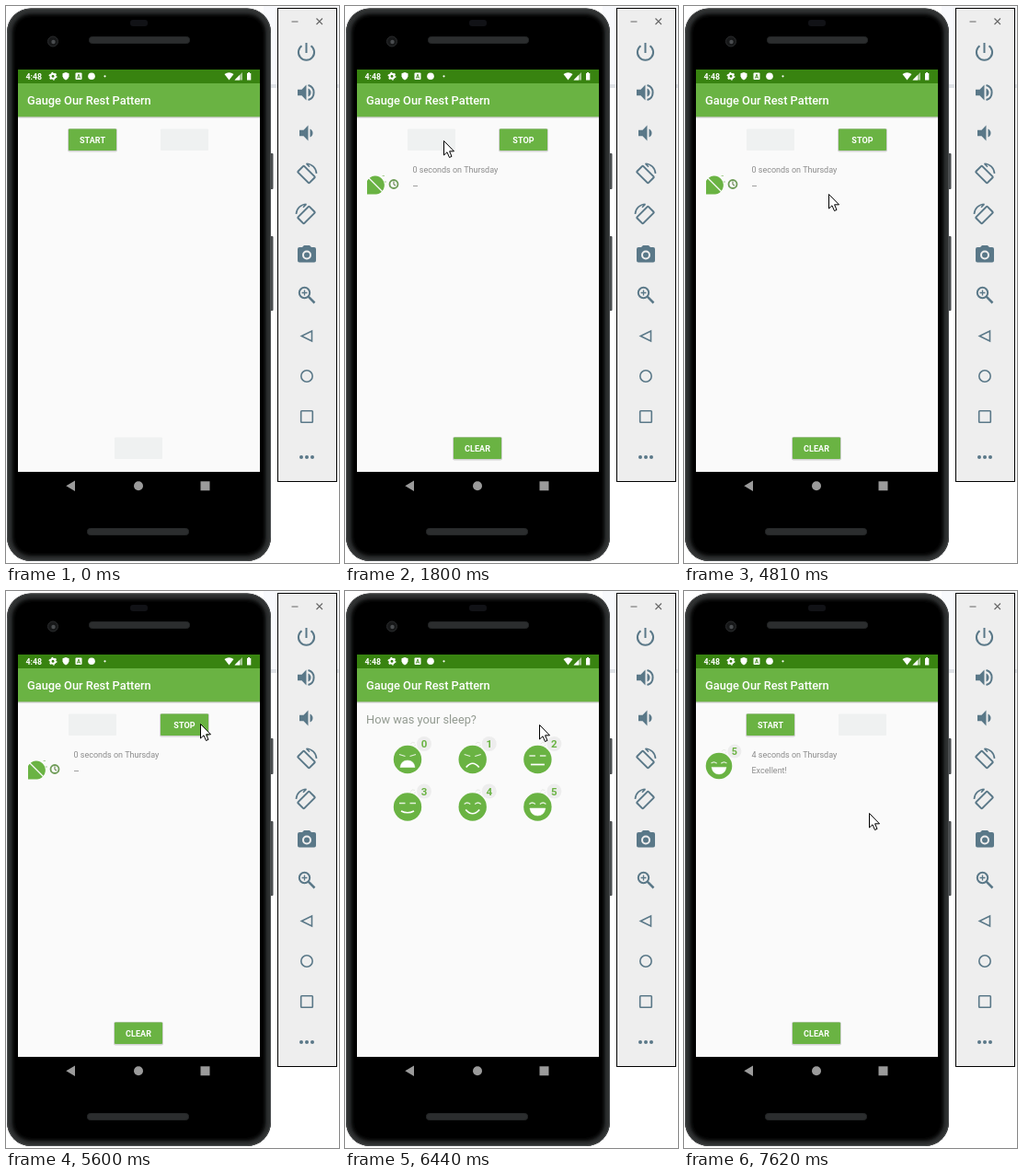
These frames come from a looping animation (362 px wide and 605 px high, 8 s). An HTML page:

```html
<!DOCTYPE html>
<html lang="en">
<head>
<meta charset="utf-8">
<title>Sleep tracker demo</title>
<style>
  html, body { margin: 0; width: 100%; height: 100%; overflow: hidden; background: #fff; }
  svg { display: block; width: 362px; height: 605px; font-family: Roboto, "Open Sans", sans-serif; }
  .btn text { font-size: 9px; font-weight: 700; fill: #fff; text-anchor: middle; letter-spacing: .1px; }
  .note { font-size: 9px; fill: #8c8c8c; }
  .line { fill: none; stroke: #5a7888; stroke-width: 2; }
  .thin { stroke-width: 1.6; }
  .solid { fill: #5a7888; }
</style>
</head>
<body>
<svg viewBox="0 0 362 605">
  <defs>
    <clipPath id="screen"><rect x="13" y="69" width="263" height="437"/></clipPath>
    <clipPath id="body"><rect x="1" y="2.500" width="287" height="600.500" rx="26"/></clipPath>
    <filter id="soft"><feGaussianBlur stdDeviation="2.500"/></filter>
    <linearGradient id="shade" x2="0" y2="1">
      <stop offset="0" stop-color="#000" stop-opacity=".25"/>
      <stop offset="1" stop-color="#000" stop-opacity="0"/>
    </linearGradient>
  </defs>

  <rect width="362" height="605" fill="#fff"/>
  <rect x="280" width="82" height="86" fill="#f8f9fc"/>
  <rect x="280" y="85" width="82" height="4" fill="#dfe2e7"/>

  <g id="phone">
    <rect x="286" y="160" width="4.500" height="39" rx="1" fill="#4a4e50"/>
    <rect x="286" y="250" width="4.500" height="81" rx="1" fill="#4a4e50"/>
    <g clip-path="url(#body)">
      <rect width="290" height="605" fill="#000"/>
      <rect x="3" y="5" width="283" height="596" rx="24" fill="none" stroke="#3c3f41" stroke-width="6" filter="url(#soft)"/>
      <rect x="1.500" y="3" width="286" height="599.500" rx="25.500" fill="none" stroke="#4c4f51"/>
      <rect x="5.500" y="7" width="278" height="592" rx="22" fill="none" stroke="#26282a"/>
    </g>
    <circle cx="51" cy="38.500" r="5.500" fill="#171819" stroke="#2a2c2d"/>
    <circle cx="51.500" cy="39" r="2.200" fill="#4a4d50"/>
    <rect x="135" y="15" width="19" height="7" rx="3" fill="#111216"/>
    <rect x="90.500" y="33.500" width="109" height="7" rx="3" fill="#2b2d2e" stroke="#242627"/>
    <rect x="88.500" y="567.500" width="110" height="7" rx="3" fill="#2b2d2e" stroke="#242627"/>
    <g fill="#9b9b9b">
      <path d="M75 515.500V527L65.300 521.200Z"/>
      <circle cx="144" cy="521.200" r="5"/>
      <rect x="211.500" y="516.300" width="10" height="10"/>
    </g>
  </g>

  <g clip-path="url(#screen)">
    <rect x="13" y="69" width="263" height="437" fill="#fafafa"/>
    <g id="tracker">
      <g id="oldRow">
        <path d="M24 190A10 10 0 1 1 34 204.500H24Z" fill="#6ab343"/>
        <path d="M25 186L43.500 204.500" stroke="#fafafa" stroke-width="1.200"/>
        <path d="M40.500 184.500H43M42.500 191H45" stroke="#a9cf94"/>
        <circle cx="53" cy="193.500" r="4.500" fill="#fafafa" stroke="#6f9c58" stroke-width="1.800"/>
        <path d="M53 190.500V194L55.200 195" fill="none" stroke="#58763f"/>
        <text class="note" x="73.500" y="181">0 seconds on Thursday</text>
        <path d="M74 195.500H79" stroke="#a0a0a0"/>
      </g>
      <g id="newRow">
        <g id="rated" transform="translate(38 190) scale(.94)"></g>
        <text class="note" x="73.500" y="181">4 seconds on Thursday</text>
        <text class="note" x="73.500" y="198">Excellent!</text>
      </g>
    </g>
    <g id="quality">
      <text x="23" y="144" font-size="12.800" fill="#929a90">How was your sleep?</text>
    </g>
    <rect x="13" y="120" width="263" height="2.500" fill="url(#shade)"/>
    <rect x="13" y="69" width="263" height="15" fill="#388310"/>
    <rect x="13" y="84" width="263" height="36.300" fill="#6ab343"/>
    <text x="23" y="107" font-size="12.800" font-weight="500" fill="#fff">Gauge Our Rest Pattern</text>
    <g fill="#fff">
      <text x="21.500" y="80" font-size="8.800" font-weight="700">4:48</text>
      <circle cx="51" cy="76.300" r="2.500" fill="none" stroke="#fff" stroke-width="2"/>
      <circle cx="51" cy="76.300" r="3.800" fill="none" stroke="#fff" stroke-width="1.400" stroke-dasharray="1.700 2.280"/>
      <path d="M65 72L68.500 73.300V76.500Q68 79 65 80.500Q62 79 61.500 76.500V73.300Z"/>
      <rect x="75.500" y="72.500" width="7" height="7.500" rx="1"/>
      <path d="M77.300 78.700L79 74L80.700 78.700M78 77.300H80" fill="none" stroke="#388310" stroke-width=".8"/>
      <circle cx="93" cy="76.300" r="3.800"/>
      <circle cx="107.500" cy="76.300" r="1.100"/>
      <path d="M237.500 74Q242.500 70.500 247.500 74L242.500 80.500Z"/>
      <path d="M257 72V80.500H248.500Z" fill-opacity=".55"/>
      <path d="M254 75V80.500H248.500Z"/>
      <path d="M262 73H263V72H265V73H266.300V80.500H262Z"/>
    </g>
  </g>

  <g id="panel">
    <rect x="295.500" y="2.500" width="64" height="514" fill="#eee" stroke="#000"/>
    <path d="M310.500 17H317.500M337.500 13.500L344 20M344 13.500L337.500 20" stroke="#666" stroke-width="1.100"/>
    <g transform="translate(326.500 50)" class="line">
      <path d="M0 -10V1M-5 -6.800A8.600 8.600 0 1 0 5 -6.800"/>
    </g>
    <g transform="translate(326.500 94)">
      <path id="horn" class="solid" d="M-9.500 -3.200H-5L0 -8.500V8.500L-5 3.200H-9.500Z"/>
      <path id="wave" class="solid" d="M2 -4.500Q5 -3 5 0T2 4.500Z"/>
      <path class="line" d="M2 -8A8.300 8.300 0 0 1 2 8"/>
    </g>
    <g transform="translate(328.500 138)">
      <use href="#horn"/>
      <use href="#wave"/>
    </g>
    <g transform="translate(326.500 182)">
      <g id="turn" class="line">
        <rect x="-4.800" y="-8.800" width="9.600" height="17.600" rx="1" transform="translate(0 1) rotate(-45)"/>
        <path class="thin" d="M0 -10.800A11.200 11.200 0 0 1 11 0M0 -10.800L3.500 -7.300"/>
      </g>
    </g>
    <use href="#turn" transform="translate(326.500 226) scale(-1 1)"/>
    <g transform="translate(327 269.500)">
      <path class="solid" d="M-3 -9.500H3L5 -7.500H8Q10 -7.500 10 -5.500V7Q10 9 8 9H-8Q-10 9 -10 7V-5.500Q-10 -7.500 -8 -7.500H-5Z"/>
      <circle class="solid" cy="1" r="4" stroke="#eee" stroke-width="2"/>
    </g>
    <g transform="translate(327 314)" class="line">
      <circle cx="-2.500" cy="-2.500" r="5.700"/>
      <path d="M1.700 1.700L8.500 8.500" stroke-width="2.500"/>
      <path d="M-5.500 -2.500H.5M-2.500 -5.500V.5" stroke-width="1.300"/>
    </g>
    <path class="line thin" d="M332.500 353V364L321.300 358.500Z"/>
    <circle class="line thin" cx="327" cy="402" r="6.200"/>
    <rect class="line thin" x="320.700" y="439.700" width="12.600" height="12.600" rx=".8"/>
    <g class="solid">
      <circle cx="321" cy="490" r="2"/><circle cx="327" cy="490" r="2"/><circle cx="333" cy="490" r="2"/>
    </g>
  </g>

  <path id="cursor" d="M.5 .5V16L4 12.800L6.500 18.500L9 17.400L6.600 11.800H11.500Z" fill="#fff" stroke="#000"/>
</svg>

<script>
const LOOP = 8000;
const GREEN = '#6ab343';
const $ = id => document.getElementById(id);

function add(parent, tag, attrs, text = '') {
  const el = document.createElementNS('http://www.w3.org/2000/svg', tag);
  for (const key in attrs) el.setAttribute(key, attrs[key]);
  el.textContent = text;
  return parent.appendChild(el);
}

// Buttons
function makeButton(label, x, y) {
  const g = add($('tracker'), 'g', { class: 'btn' });
  const box = { width: 52, height: 23.5, rx: 1 };
  add(g, 'rect', { ...box, x, y, fill: '#eff1f1' });
  const on = add(g, 'g', {});
  add(on, 'rect', { x: x - 1, y: y - .5, width: 54, height: 25.5, rx: 2, fill: '#000', opacity: .16 });
  add(on, 'rect', { ...box, x, y, fill: GREEN });
  const glow = add(on, 'rect', { ...box, x, y, fill: '#fff', opacity: 0 });
  add(on, 'text', { x: x + 26, y: y + 15.5 }, label);
  return (enabled, pressed) => {
    on.style.display = enabled ? '' : 'none';
    glow.setAttribute('opacity', pressed ? .18 : 0);
  };
}
const setStart = makeButton('START', 68, 133.5);
const setStop = makeButton('STOP', 168, 133.5);
const setClear = makeButton('CLEAR', 118, 468.5);

// Faces, centred on 0,0
const SLANTED = 'M-9 -5.500L-2.500 -3.500M9 -5.500L2.500 -3.500';
const FLAT = 'M-9 -4H-2.500M2.500 -4H9';
const ARCHED = 'M-9 -3Q-6 -6 -2.500 -3M2.500 -3Q6 -6 9 -3';
const EYES = [SLANTED, SLANTED, FLAT, FLAT, ARCHED, ARCHED];
const MOUTHS = [
  'M-8 8.500Q-7 1 0 1T8 8.500Z',
  'M-7 8.500Q0 0 7 8.500',
  'M-7.500 5.500H7.500',
  'M-7 4.500Q0 8 7 4.500',
  'M-7.500 3Q0 11.500 7.500 3',
  'M-8.500 1.500H8.500Q7 9.500 0 9.500T-8.500 1.500Z'
];

function drawFace(g, score) {
  const open = score % 5 === 0;
  add(g, 'circle', { cx: 18, cy: -17, r: 8, fill: '#ededed' });
  add(g, 'path', { d: 'M3 -16.500Q5 -20 8 -18M7 -14.500L9 -16', fill: 'none', stroke: '#e6e9e4' });
  add(g, 'circle', { r: 15.2, fill: GREEN });
  add(g, 'path', { d: EYES[score], fill: 'none', stroke: '#e4f1dc', 'stroke-width': 1.3 });
  add(g, 'path', {
    d: MOUTHS[score], fill: open ? '#fff' : 'none',
    stroke: '#fff', 'stroke-width': open ? .5 : 1.7
  });
  add(g, 'text', {
    x: 18, y: -13, fill: GREEN, 'font-size': 11.5, 'font-weight': 700, 'text-anchor': 'middle'
  }, score);
}
for (let i = 0; i < 6; i++) {
  const x = 68 + i % 3 * 70.7, y = i < 3 ? 183 : 234.5;
  drawFace(add($('quality'), 'g', { transform: `translate(${x} ${y})` }), i);
}
drawFace($('rated'), 5);

const BURSTS = [
  [0, 0, 1], [510, 1250, 11], [1320, 1800, 7], [2170, 2570, 6], [2720, 2870, 3],
  [4810, 4810, 1], [4950, 5750, 12], [5810, 6520, 10], [6760, 7530, 11], [7620, 7620, 1]
];
const TICKS = BURSTS.flatMap(([from, to, n]) =>
  Array.from({ length: n }, (_, i) => Math.round((from + (to - from) * i / Math.max(1, n - 1)) / 10) * 10));
const snap = t => TICKS.filter(k => k <= t).pop();

// Pointer stops: time, x, y
const POINTER = [
  [510, 255, 590], [1250, 107, 147], [1320, 107, 146], [2090, 107, 146],
  [2570, 154, 195], [2650, 154, 195], [2870, 157, 202], [4740, 157, 202],
  [4810, 157, 204], [4880, 157, 204], [5390, 218, 133], [5610, 211, 144],
  [6050, 211, 144], [6120, 211, 145], [6690, 211, 145], [7070, 201, 241], [LOOP, 201, 241]
];

const clamp = v => Math.min(1, Math.max(0, v));
const ramp = (t, from, to) => clamp((t - from) / (to - from));
const ease = p => (1 - Math.cos(Math.PI * p)) / 2;

function pointerAt(t) {
  const i = POINTER.findIndex(p => p[0] > t);
  const [t0, x0, y0] = POINTER[i - 1], [t1, x1, y1] = POINTER[i];
  const p = ease(ramp(t, t0, t1));
  return [Math.round(x0 + (x1 - x0) * p), Math.round(y0 + (y1 - y0) * p)];
}

const SLEEP = 1480, RATE = 5880, SLIDE = 420, BACK = 7220;

function draw(now) {
  const t = snap(now % LOOP);
  const rating = t >= RATE && t < BACK;
  const sleeping = t >= SLEEP && t < RATE;

  $('tracker').style.display = rating ? 'none' : '';
  $('quality').style.display = rating ? '' : 'none';
  const shift = Math.round(263 * (1 - ease(ramp(t, RATE, RATE + SLIDE))));
  $('quality').setAttribute('transform', `translate(${shift} 0)`);

  setStart(!sleeping, t >= 1400 && t < SLEEP);
  setStop(sleeping, t >= 5680);
  setClear(t >= SLEEP, false);

  const swap = ramp(t, 7380, 7620);
  $('oldRow').setAttribute('opacity', ramp(t, 1480, 1720) * (1 - swap));
  $('newRow').setAttribute('opacity', swap);

  $('cursor').style.display = t < 510 ? 'none' : '';
  if (t >= 510) $('cursor').setAttribute('transform', `translate(${pointerAt(t)})`);
}

const begin = performance.now();
function tick() {
  draw(performance.now() - begin);
  requestAnimationFrame(tick);
}
tick();
</script>
</body>
</html>
```
